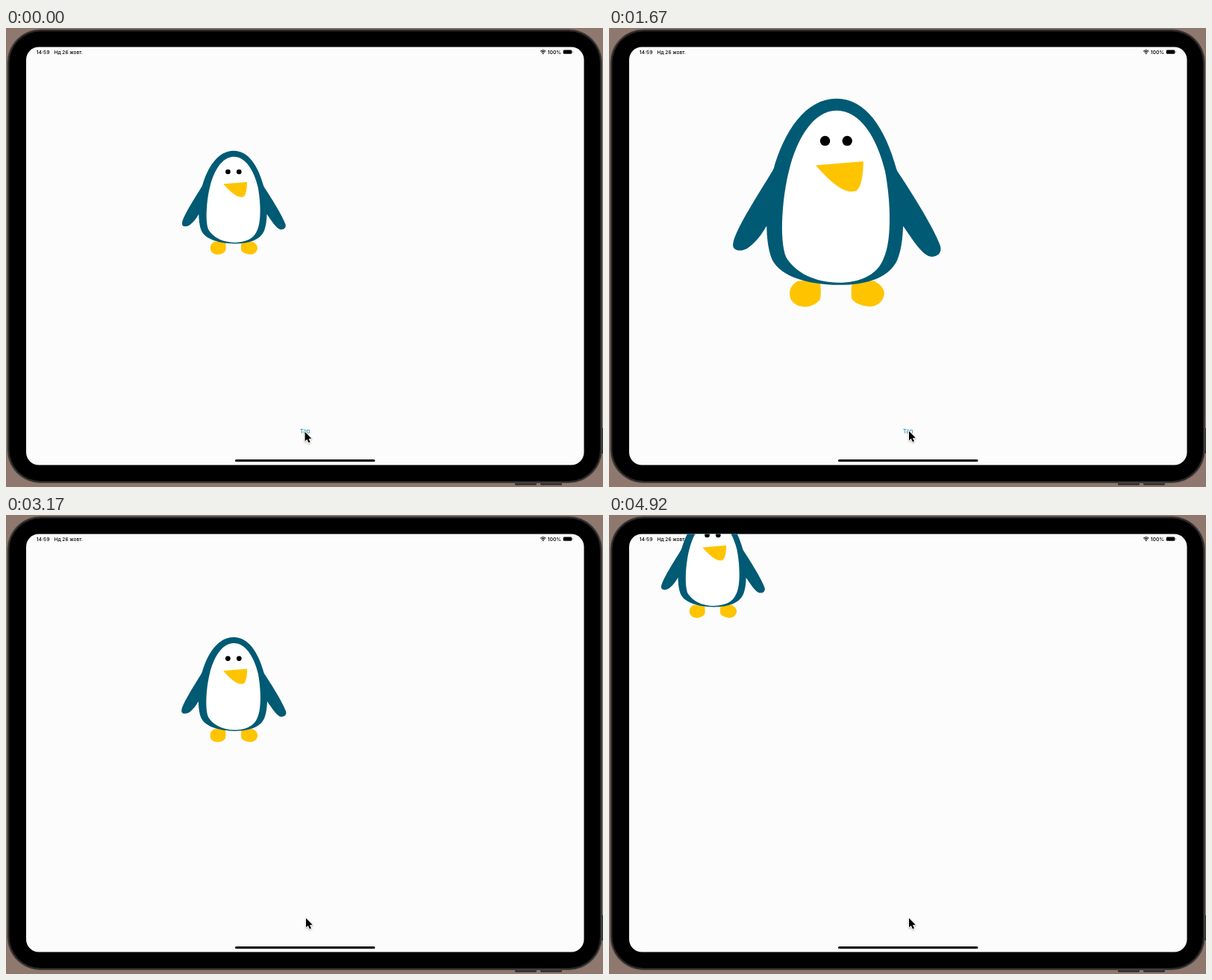
Recreate the animation shown at these times as an HTML page with a canvas. Size 800x616 px, loop 5000 ms.

```html
<!DOCTYPE html>
<html lang="uk">
<head>
<meta charset="utf-8">
<title>Penguin spring</title>
<style>
  html, body { margin: 0; width: 100%; height: 100%; overflow: hidden; background: #8f786d; }
  canvas { display: block; }
</style>
</head>
<body>
<canvas id="stage" width="800" height="616"></canvas>
<script>
const ctx = document.getElementById('stage').getContext('2d');

const LOOP = 5000;
const STEP = 1000 / 12;
const TEAL = '#005a74';
const YELLOW = '#ffc400';
const FONT = 'Inter, Roboto, sans-serif';

// Each tap hides the button for one second and starts a spring.
const TAPS = { grow: 588, shrink: 2558, move: 4600 };
const BUTTON_DELAY = 1000;

const CENTER = { x: 305.3, y: 234.3 };
const DRAWN_SCALE = 2.073;
const SHIFT = -138.6;

const shapes = {
  feet: new Path2D(`M252 343C243 347 240 354 240 361C240 372 249 379 262 379C271 378.5 278 374 282 369C284 362 283 352 282 342Z
    M357 343C367 348 371.5 355 371 362C369 373 360 379 350 378.5C340 378 330 374 326 368C324.5 360 325.5 350 327 342Z`),
  leftWing: new Path2D('M221 182C200 218 165 270 161.5 291C160 301 171 303 181 298C190 292 200 281 207 268L240 240Z'),
  rightWing: new Path2D('M386 186C410 222 440 270 448.5 294C452 305 443 311 434 309C422 305 410 285 398 268L370 240Z'),
  body: new Path2D('M305 90C262 90 232 135 217 190C208 225 203 285 216 314C228 337 265 348 308 348.5C348 348.5 378 338 389 314C402 285 398 222 388 188C372 130 345 90 305 90Z'),
  belly: new Path2D('M305 106.5C272 106.5 249 148 239 190C230 225 225 285 235 310C248 332 275 345 308 345.5C338 345 361 335 370 312C383 285 379 225 372 190C361 145 338 106.5 305 106.5Z'),
  beak: new Path2D('M276 182.5L342 177C342 195 339 214 332 218C318 223 300 210 276 182.5Z'),
  cursor: new Path2D('M0 0V12.6L2.8 10L4.9 14.6L7 13.7L5 9.2L8.8 9Z')
};

function spring(ms) {
  if (ms <= 0) return 0;
  const t = ms / 1000, freq = 7.9, decay = 4.56, velocity = 5;
  const a = freq * t;
  return 1 - Math.exp(-decay * t) * (Math.cos(a) + (decay - velocity) / freq * Math.sin(a));
}

function fill(path, color) {
  ctx.fillStyle = color;
  ctx.fill(path);
}

function roundRect(x, y, w, h, r, color) {
  const path = new Path2D();
  path.roundRect(x, y, w, h, r);
  fill(path, color);
  return path;
}

function dot(x, y, r, color) {
  const path = new Path2D();
  path.arc(x, y, r, 0, Math.PI * 2);
  fill(path, color);
}

function text(str, x, y, size, weight, color) {
  ctx.font = `${weight} ${size}px ${FONT}`;
  ctx.fillStyle = color;
  ctx.fillText(str, x, y);
}

function drawDevice() {
  ctx.fillStyle = '#8f786d';
  ctx.fillRect(0, 0, 800, 616);
  roundRect(682, 608, 29, 5.5, 1.5, '#2c2c2e');
  roundRect(716, 608, 29, 5.5, 1.5, '#2c2c2e');
  roundRect(797, 537, 4, 34, 1, '#2c2c2e');
  roundRect(1.5, 1.5, 797.5, 609.5, 45, '#575150');
  roundRect(2.5, 2.5, 795.5, 607.5, 44, '#2b2929');
  roundRect(4.5, 4.5, 791.5, 603.5, 42, '#000');
  return roundRect(27, 25.5, 747.5, 561, 17, '#fcfcfc');
}

function drawPenguin(scale, shift) {
  ctx.save();
  ctx.translate(CENTER.x + shift, CENTER.y + shift);
  ctx.scale(scale / DRAWN_SCALE, scale / DRAWN_SCALE);
  ctx.translate(-CENTER.x, -CENTER.y);
  fill(shapes.feet, YELLOW);
  fill(shapes.leftWing, TEAL);
  fill(shapes.rightWing, TEAL);
  fill(shapes.body, TEAL);
  fill(shapes.belly, '#fff');
  dot(289, 148.6, 6.9, '#000');
  dot(319.7, 148.6, 6.9, '#000');
  fill(shapes.beak, YELLOW);
  ctx.restore();
}

function drawWifi(x, y) {
  ctx.strokeStyle = '#000';
  ctx.lineWidth = 1.1;
  for (const r of [3, 5]) {
    ctx.beginPath();
    ctx.arc(x, y, r, -Math.PI * 0.75, -Math.PI * 0.25);
    ctx.stroke();
  }
  dot(x, y - 0.6, 0.9, '#000');
}

function drawStatus() {
  text('14:59', 40.7, 34.5, 6.8, 500, '#000');
  text('Нд 26 жовт.', 64.5, 34.5, 6.6, 500, '#000');
  text('100%', 725.7, 34.5, 6.8, 500, '#000');
  drawWifi(719.7, 34.8);
  roundRect(746.3, 29.2, 12.4, 5.8, 1.8, '#8c8c8c');
  roundRect(747, 29.8, 11, 4.6, 1.2, '#000');
  roundRect(759.1, 31.1, 0.8, 2, 0.4, '#8c8c8c');
  roundRect(307, 579, 187.5, 3, 1.5, '#000');
}

function drawCursor(x, y) {
  ctx.save();
  ctx.translate(x, y);
  ctx.shadowColor = 'rgba(0,0,0,.3)';
  ctx.shadowBlur = 2;
  ctx.shadowOffsetY = 1;
  ctx.strokeStyle = '#fff';
  ctx.lineWidth = 1.8;
  ctx.lineJoin = 'round';
  ctx.stroke(shapes.cursor);
  ctx.shadowColor = 'transparent';
  fill(shapes.cursor, '#000');
  ctx.restore();
}

function render(time) {
  const scale = 1 + spring(time - TAPS.grow) - spring(time - TAPS.shrink);
  const shift = SHIFT * spring(time - TAPS.move);
  const buttonHidden = Object.values(TAPS)
    .some(start => time >= start && time < start + BUTTON_DELAY);

  const screen = drawDevice();
  ctx.save();
  ctx.clip(screen);
  drawPenguin(scale, shift);
  if (!buttonHidden) text('Tap', 393.7, 544, 8, 400, '#1686ac');
  drawStatus();
  ctx.restore();
  drawCursor(time < TAPS.grow ? 400.6 : 402, time < TAPS.grow ? 542 : 541);
}

function tick(now) {
  const frame = Math.min(59, Math.floor((now % LOOP + 4) / STEP));
  render(frame * STEP);
  requestAnimationFrame(tick);
}

requestAnimationFrame(tick);
</script>
</body>
</html>
```
